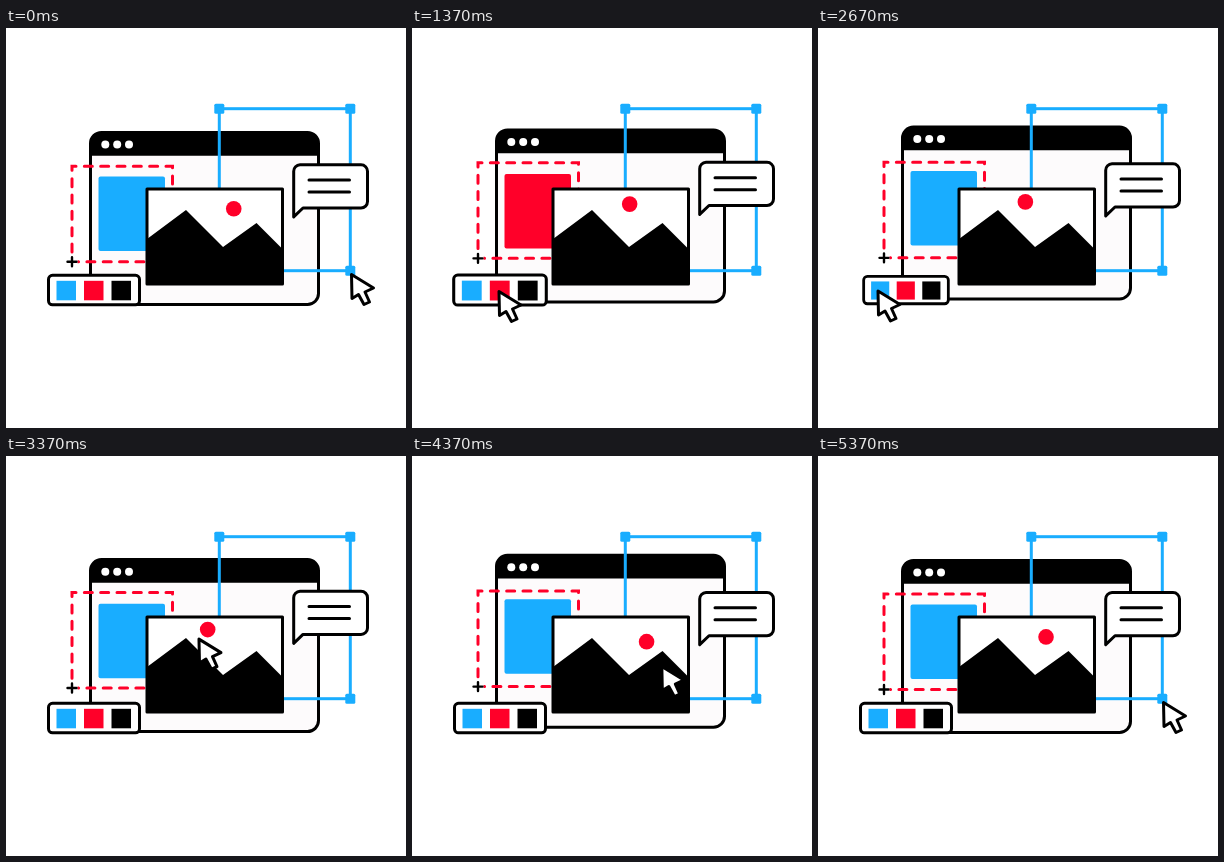
These frames come from a looping animation (400x400 px, 5.41 s). An HTML page:

```html
<!DOCTYPE html>
<html lang="en">
<head>
<meta charset="utf-8">
<title>Design tools</title>
<style>
  html, body { margin: 0; width: 100%; height: 100%; overflow: hidden; background: #fff; }
  svg { display: block; width: 100vw; height: 100vh; }
  .line { stroke: #000; stroke-width: 3; stroke-linejoin: round; stroke-linecap: round; }
  .paper { fill: #fdfbfc; }
  .white { fill: #fff; }
  .blue { fill: #19adff; }
  .red { fill: #ff0029; }
</style>
</head>
<body>
<svg viewBox="0 0 400 400">
  <g id="browser">
    <rect class="line paper" x="84.5" y="101.7" width="228" height="172" rx="11"/>
    <path d="M84.5 125V112.7a11 11 0 0 1 11-11h206a11 11 0 0 1 11 11V125z"/>
    <g class="white">
      <circle cx="99.3" cy="113.8" r="4"/>
      <circle cx="111.2" cy="113.8" r="4"/>
      <circle cx="123" cy="113.8" r="4"/>
    </g>
    <rect id="square" x="92.5" y="145.8" width="66.5" height="74.5" rx="2"/>
  </g>
  <g id="marquee">
    <rect x="66" y="136.2" width="100.5" height="95.5" fill="none" stroke="#ff0029" stroke-width="3"
      stroke-linecap="round" stroke-dasharray="8 8.33" stroke-dashoffset="4"/>
    <path d="M60.5 231.7h11M66 226.2v11" stroke="#fff" stroke-width="7"/>
    <path d="M61.5 231.7h9M66 227.2v9" class="line" style="stroke-width:2.4"/>
  </g>
  <g id="selection">
    <rect x="213.3" y="80.7" width="131" height="162" fill="none" stroke="#19adff" stroke-width="3"/>
    <g id="handles" class="blue"></g>
  </g>
  <g>
    <rect class="white" x="141" y="161" width="135.5" height="95"/>
    <circle id="sun" class="red" r="7.8"/>
    <path d="M141 211L180 182L217 219L250.5 195L276.5 221V256H141z"/>
    <rect class="line" fill="none" x="141" y="161" width="135.5" height="95"/>
  </g>
  <g id="bubble">
    <path class="line white" d="M294 136.2h61a6.5 6.5 0 0 1 6.5 6.5v30.2a6.5 6.5 0 0 1-6.5 6.5H297L287.7 188.3V142.7a6.5 6.5 0 0 1 6.3-6.5z"/>
    <path class="line" d="M303 151.5h40.5M303 163.5h40.5"/>
  </g>
  <g id="palette">
    <rect class="line white" x="42.5" y="247.3" width="91" height="29.5" rx="4"/>
    <rect class="blue" x="50.5" y="252.8" width="19.5" height="19.5"/>
    <rect class="red" x="78" y="252.8" width="19.5" height="19.5"/>
    <rect x="105.5" y="252.8" width="19.5" height="19.5"/>
  </g>
  <path id="cursor" class="line white" d="M0 0L.5 24L7 20L12.5 30L18 27.5L13.5 17.5L22 13.5z"/>
</svg>
<script>
const LOOP = 5410, BOB = LOOP / 3;
const part = Object.fromEntries([...document.querySelectorAll('[id]')].map(el => [el.id, el]));

part.handles.innerHTML = [[213.3, 80.7], [344.3, 80.7], [344.3, 242.7]]
  .map(([x, y]) => `<rect x="${x - 5}" y="${y - 5}" width="10" height="10" rx="1.5"/>`).join('');

const clamp = u => Math.min(1, Math.max(0, u));
const ease = u => u < 0.5 ? 4 * u ** 3 : 1 - 4 * (1 - u) ** 3;
const bump = (dt, half) => Math.abs(dt) < half ? Math.cos(dt / half * Math.PI / 2) ** 2 : 0;
const bob = (t, amp, lag) => amp * Math.cos(2 * Math.PI * (t / BOB - lag));
const shift = (el, x, y) => el.setAttribute('transform', `translate(${x.toFixed(2)} ${y.toFixed(2)})`);
const scaleAt = (el, x, y, s) =>
  el.setAttribute('transform', `translate(${x} ${y}) scale(${s.toFixed(4)}) translate(${-x} ${-y})`);

// The sun drifts along an arc until the cursor drags it back.
const GRAB = 3520, DROP = 4150, DRIFT = 9.3 / 1000, START = 31;
function sunAt(t) {
  const low = START - DRIFT * GRAB, high = START + DRIFT * (LOOP - DROP);
  const deg = t < GRAB ? START - DRIFT * t
    : t < DROP ? low + (high - low) * ease((t - GRAB) / (DROP - GRAB))
    : high - DRIFT * (t - DROP);
  const a = deg * Math.PI / 180;
  return [202 + 50 * Math.sin(a), 223.6 - 50 * Math.cos(a)];
}
const holdSun = t => { const [x, y] = sunAt(t); return [x - 2, y + 4]; };

const corner = [345.5, 246.5], black = [114.5, 264.5], red = [87, 263.5], blue = [60, 263];
const moves = [
  { from: corner, to: black, start: 40, end: 670, sag: 14, lift: 1 },
  { from: black, to: red, start: 880, end: 1150, sag: 3, lift: 1 },
  { from: red, to: blue, start: 2150, end: 2550, sag: 3, lift: 1 },
  { from: blue, to: holdSun(GRAB), start: 2900, end: 3500, sag: 14, lift: 0 },
  { from: holdSun(DROP), to: corner, start: 4190, end: 4740, sag: 24, lift: 0 }
];

function cursorAt(t) {
  if (t >= GRAB && t < moves[4].start) return [...holdSun(Math.min(t, DROP)), 0];
  const m = moves.filter(m => t >= m.start).pop() || moves[0];
  const u = clamp((t - m.start) / (m.end - m.start)), e = ease(u);
  const x = m.from[0] + (m.to[0] - m.from[0]) * e;
  const y = m.from[1] + (m.to[1] - m.from[1]) * e + 4 * m.sag * e * (1 - e);
  return [x, y, m.lift * ease(clamp(u / 0.25)) * ease(clamp((1 - u) / 0.16))];
}

const picks = [[720, '#000'], [1180, '#ff0029'], [2650, '#19adff']];

function draw(t) {
  shift(part.browser, 0, bob(t, 2.75, 0));
  shift(part.marquee, 0, bob(t, 2.5, 0.1));
  shift(part.bubble, 0, bob(t, 2, 0.2));
  shift(part.sun, ...sunAt(t));

  const pick = picks.filter(([at]) => t >= at).pop();
  part.square.setAttribute('fill', pick ? pick[1] : '#19adff');

  const press = picks.reduce((s, [at]) =>
    s - 0.07 * bump(t - at - 15, 120) + 0.02 * bump(t - at - 220, 120), 1);
  scaleAt(part.palette, 88, 262, press);
  scaleAt(part.selection, 278.8, 161.7, 1 - 0.04 * bump(t - 5070, 230));

  const [x, y, lift] = cursorAt(t);
  part.cursor.setAttribute('transform',
    `translate(${x.toFixed(2)} ${y.toFixed(2)}) rotate(${(-19 * lift).toFixed(2)}) scale(${(1 + 0.2 * lift).toFixed(3)})`);
}

const origin = performance.now();
function tick() {
  draw((performance.now() - origin) % LOOP);
  requestAnimationFrame(tick);
}
draw(0);
requestAnimationFrame(tick);
</script>
</body>
</html>
```
